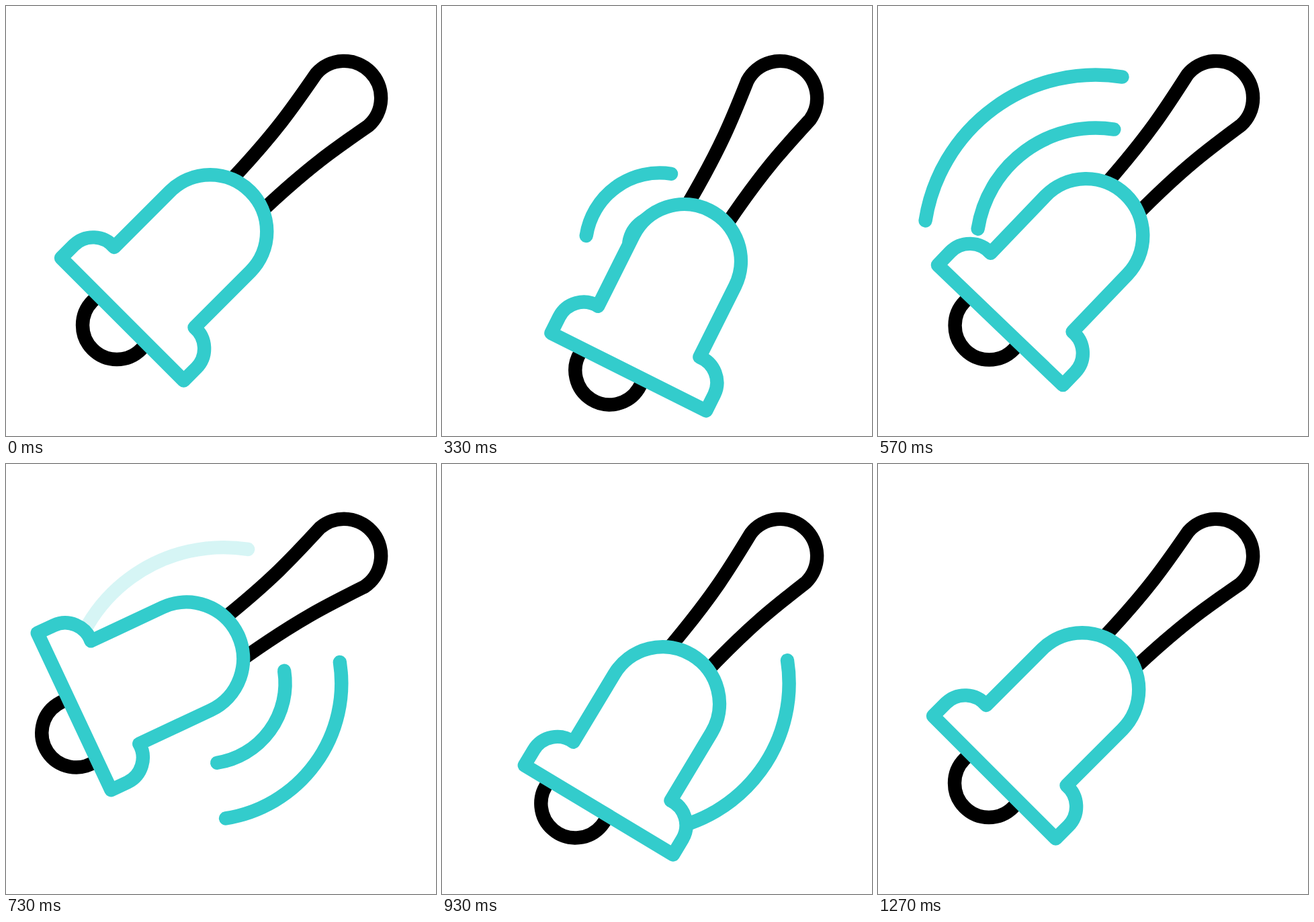
An HTML page for the animation above (1.67 s loop, 640 px wide and 640 px high).

```html
<!DOCTYPE html>
<html lang="en">
<head>
<meta charset="utf-8">
<title>Hand bell</title>
<style>
  html, body { margin: 0; width: 100%; height: 100%; overflow: hidden; background: #fff; }
  svg { display: block; width: 100vw; height: 100vh; }
  path, circle { stroke-width: 20.4; stroke-linejoin: round; fill: none; }
  .black { stroke: #000; }
  .teal { stroke: #3cc; stroke-linecap: round; }
  #bell { fill: #fff; }
</style>
</head>
<body>
<svg viewBox="0 0 640 640">
  <g id="waves"></g>
  <circle id="clapper" class="black" cx="165" cy="475" r="51"/>
  <path id="handle" class="black" d="M321 273 L336.5 257.5 C402 187.5 427 151 461.7 100.7 A55 55 0 1 1 539.3 178.3 C489 213 452.5 238 382.5 303.5 L367 319"/>
  <path id="bell" class="teal" d="M82 375 L101 356 A41 41 0 0 1 161 359 L244.25 275.75 A84.5 84.5 0 0 1 363.75 395.25 L280.5 478.5 A41 41 0 0 1 283.5 538.5 L264.5 557.5 Z"/>
</svg>
<script>
const LOOP = 1670, STEP = 100 / 3, LAST = 33;
const GRIP = "504 137", JOINT = "366 275";
const $ = id => document.getElementById(id);

// Swing angles in degrees: [step, angle]
const swing = {
  handle: [[0, 0], [8.3, -19.8], [15.3, 13.1], [20.4, -6], [27.35, 2.5], [32, 0]],
  bell: [[0, 0], [8.4, -28.7], [15.6, 26.3], [21.36, -17], [27.9, 2.2], [32, 0]],
  clapper: [[0, 0], [8.4, -20.2], [15.38, 18.2], [20.4, -9], [26.82, 1], [33, 0]]
};

function angle(keys, n) {
  const i = keys.findIndex(k => k[0] > n);
  if (i < 0) return 0;
  const [t0, a0] = keys[i - 1], [t1, a1] = keys[i];
  const u = (n - t0) / (t1 - t0);
  return a0 + (a1 - a0) * u * u * (3 - 2 * u);
}

// Each swing sends out two arcs, the second later and smaller
const waves = [];
for (const [side, begin] of [[-1, 0], [1, 8]]) {
  for (const [delay, life, size] of [[0, 14.7, 275], [2.6, 15.1, 236]]) {
    const el = document.createElementNS("http://www.w3.org/2000/svg", "path");
    el.setAttribute("class", "teal");
    $("waves").append(el);
    waves.push({ el, side, size, life, start: begin + delay });
  }
}

function growth(u) {
  const v = 1 - u;
  return 0.07 + 0.93 * (0.6 * v * v * u + 3 * v * u * u + u * u * u);
}

function drawWave({ el, side, size, life, start }, n) {
  const t = n - start;
  const alpha = t <= 0 ? 0 : Math.max(0, Math.min(1, (life - 0.2 - t) / 2.5));
  el.setAttribute("opacity", alpha);
  if (!alpha) return;
  const r = size * growth(t / life), far = 0.988 * r, near = 0.154 * r;
  const [x, y] = side < 0 ? [324, 359] : [295.7, 326.3];
  el.setAttribute("d",
    `M${x + side * far} ${y - near} A${r} ${r} 0 0 1 ${x + near} ${y + side * far}`);
}

function draw(ms) {
  const n = Math.max(0, Math.min(LAST, Math.floor((ms % LOOP - 163) / STEP)));
  const h = angle(swing.handle, n);
  const b = angle(swing.bell, n);
  const c = angle(swing.clapper, n);
  $("handle").setAttribute("transform", `rotate(${h} ${GRIP})`);
  $("bell").setAttribute("transform", `rotate(${h} ${GRIP}) rotate(${b - h} ${JOINT})`);
  $("clapper").setAttribute("transform", `rotate(${c} ${GRIP})`);
  waves.forEach(w => drawWave(w, n));
}

const origin = performance.now();
function tick() {
  draw(performance.now() - origin);
  requestAnimationFrame(tick);
}
tick();
</script>
</body>
</html>
```
